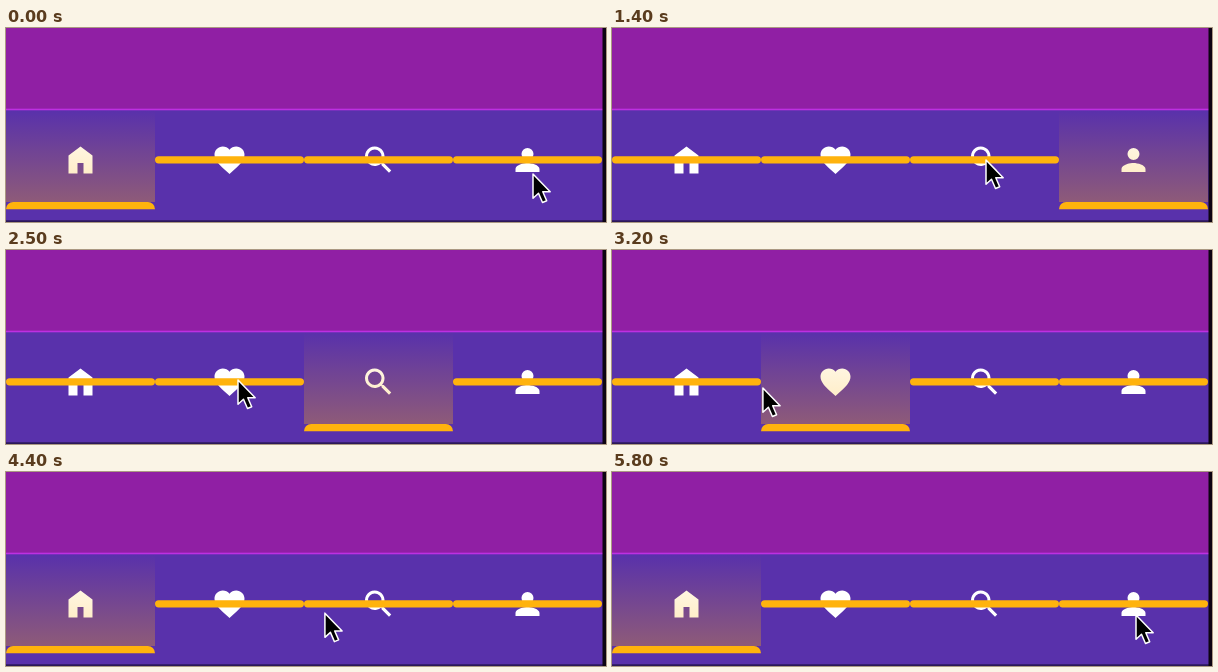
These frames come from a looping animation (600 px wide and 194 px high, 5.9 s). An HTML page:

```html
<!DOCTYPE html>
<html lang="en">
<head>
<meta charset="utf-8">
<title>Tab bar</title>
<style>
  html, body { margin: 0; width: 100%; height: 100%; overflow: hidden; background: #901fa4; }
  svg { display: block; width: 600px; height: 194px; }
</style>
</head>
<body>
<svg viewBox="0 0 600 194" xmlns="http://www.w3.org/2000/svg">
  <defs>
    <linearGradient id="glow" x1="0" y1="0" x2="0" y2="1">
      <stop offset="0" stop-color="#ffb30d" stop-opacity="0"/>
      <stop offset="1" stop-color="#ffb30d" stop-opacity=".32"/>
    </linearGradient>
  </defs>
  <rect width="600" height="82" fill="#901fa4"/>
  <rect y="82" width="600" height="112" fill="#5931ab"/>
  <rect y="80.7" width="600" height="1.6" fill="#bd30e2"/>
  <rect y="192.3" width="600" height="1.7" fill="#2b1858"/>
  <g id="tabs"></g>
  <rect x="596.5" width="3.5" height="194" fill="#0d0412"/>
  <path id="cursor" d="M0 0V24.2L5.5 19.2L9.5 28.5L13.7 26.7L9.8 17.8H17.2Z"
        fill="#000" stroke="#fff" stroke-width="1.5" stroke-linejoin="round"/>
</svg>
<script>
const LOOP = 5900, STEP = 100, FADE = 300;
const TAB_WIDTH = 149, MIDDLE = 131.8, BAR = 7.2, PANEL = 91.6;
const HOME = 0, HEART = 1, SEARCH = 2, PERSON = 3;

const icons = [
  'M4 21V9l8-6 8 6v12h-6v-7h-4v7z',
  'M12 21.35l-1.45-1.32C5.4 15.36 2 12.28 2 8.5 2 5.42 4.42 3 7.5 3c1.74 0 3.41.81 4.5 2.09C13.09 3.81 14.76 3 16.5 3 19.58 3 22 5.42 22 8.5c0 3.78-3.4 6.86-8.55 11.54z',
  'M15.5 14h-.79l-.28-.27A6.5 6.5 0 1 0 13.73 14.43l.27.28v.79l5 4.99L20.49 19zM9.5 14a4.5 4.5 0 1 1 0-9 4.5 4.5 0 0 1 0 9z',
  'M12 12a4 4 0 1 0 0-8 4 4 0 0 0 0 8zM12 14c-2.67 0-8 1.34-8 4v2h16v-2c0-2.66-5.33-4-8-4z'
];

// Tab selections: [time, tab]
const clicks = [[-1000, HOME], [350, PERSON], [1400, SEARCH], [2750, HEART], [3550, HOME]];

// Pointer moves: [start, end, x, y]
const moves = [
  [0, 0, 527, 146],
  [800, 1400, 374, 132],
  [2100, 2480, 232, 130],
  [2850, 3520, 80, 145],
  [3550, 3780, 80, 139],
  [3780, 4960, 524, 143],
  [5800, 5900, 527, 146]
];

const clamp = v => Math.max(0, Math.min(1, v));
const smooth = v => v * v * (3 - 2 * v);
const progress = (t, start, end) => smooth(clamp((t - start) / (end - start || 1)));

function add(parent, name, attrs) {
  const node = document.createElementNS('http://www.w3.org/2000/svg', name);
  for (const key in attrs) node.setAttribute(key, attrs[key]);
  return parent.appendChild(node);
}

const tabs = icons.map((d, i) => {
  const group = add(document.getElementById('tabs'), 'g', { transform: `translate(${i * TAB_WIDTH} 0)` });
  add(group, 'path', { d, fill: '#fff', transform: `translate(${TAB_WIDTH / 2 - 18} 114) scale(1.5)` });
  return {
    panel: add(group, 'rect', { width: TAB_WIDTH, fill: 'url(#glow)' }),
    bar: add(group, 'path', { fill: '#ffb30d' })
  };
});
const cursor = document.getElementById('cursor');

function openness(tab, t) {
  let value = 0;
  for (const [time, selected] of clicks) {
    const target = selected === tab ? 1 : 0;
    value += (target - value) * progress(t, time, time + FADE);
  }
  return value;
}

function barPath(y, top, bottom) {
  const w = TAB_WIDTH, b = y + BAR;
  return `M0 ${y + top}A${top} ${top} 0 0 1 ${top} ${y}H${w - top}A${top} ${top} 0 0 1 ${w} ${y + top}` +
    `V${b - bottom}A${bottom} ${bottom} 0 0 1 ${w - bottom} ${b}H${bottom}A${bottom} ${bottom} 0 0 1 0 ${b - bottom}Z`;
}

function draw(t) {
  tabs.forEach(({ panel, bar }, i) => {
    const open = openness(i, t);
    const height = PANEL * open;
    const top = MIDDLE - (height + BAR) / 2;
    panel.setAttribute('y', top);
    panel.setAttribute('height', height);
    bar.setAttribute('d', barPath(top + height, BAR / 2 * (1 + open), BAR / 2 * (1 - open)));
  });

  let x = 0, y = 0;
  for (const [start, end, toX, toY] of moves) {
    const k = end ? progress(t, start, end) : 1;
    x += (toX - x) * k;
    y += (toY - y) * k;
  }
  cursor.setAttribute('transform', `translate(${x} ${y})`);
}

const began = performance.now();
function tick() {
  const t = (performance.now() - began) % LOOP;
  draw(Math.floor(t / STEP) * STEP);
  requestAnimationFrame(tick);
}
tick();
</script>
</body>
</html>
```
